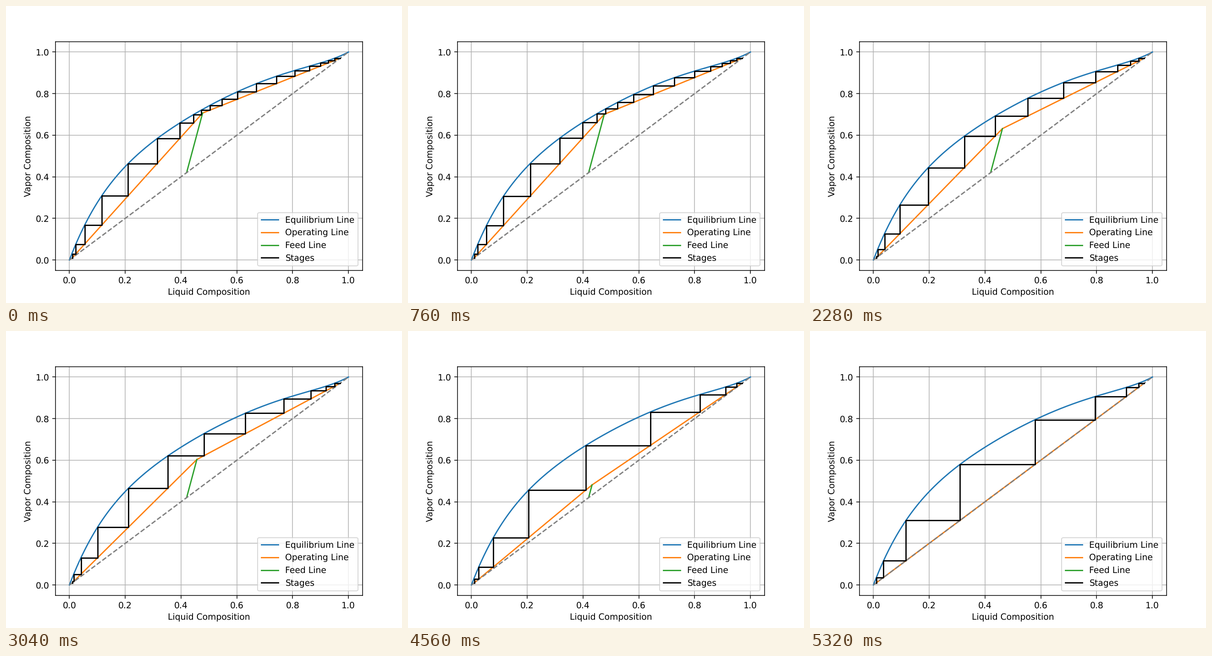
A matplotlib script that plays this animation: 864x648 px, repeating every 6.08 s.

```python
import numpy as np
import matplotlib.pyplot as plt
from matplotlib.animation import FuncAnimation

plt.rcParams["text.hinting"] = "none"

X_DIST, X_BOT, X_FEED = 0.97, 0.01, 0.42
FEED_SLOPE = 5.0
REFLUX = [1.15, 1.2, 1.5, 2, 2.5, 4, 10, 1000]

# Equilibrium curve y = x + x(1 - x) g(x), with g a polynomial through key points
G_X = [0.03, 0.116, 0.31, 0.55, 0.72, 0.87, 0.95]
G_Y = [2.335, 1.884, 1.26, 0.912, 0.76, 0.581, 0.421]
EQ_X = np.linspace(0, 1, 1001)
EQ_Y = EQ_X + EQ_X * (1 - EQ_X) * np.polyval(np.polyfit(G_X, G_Y, 6), EQ_X)


def feed_point(reflux):
    """Where the upper operating line meets the feed line."""
    slope = reflux / (reflux + 1)
    x = ((1 - slope) * X_DIST + (FEED_SLOPE - 1) * X_FEED) / (FEED_SLOPE - slope)
    return x, X_FEED + FEED_SLOPE * (x - X_FEED)


def step_stages(op_x, op_y):
    """Staircase from the distillate down to the bottoms."""
    x = y = X_DIST
    xs, ys = [x], [y]
    while x > X_BOT:
        x = max(np.interp(y, EQ_Y, EQ_X), X_BOT)
        xs.append(x)
        ys.append(y)
        y = np.interp(x, op_x, op_y)
        xs.append(x)
        ys.append(y)
    return xs, ys


fig, ax = plt.subplots(figsize=(6.4, 4.8), dpi=135)
ax.plot(EQ_X, EQ_Y, color="C0", label="Equilibrium Line")
operating, = ax.plot([], [], color="C1", label="Operating Line")
feed, = ax.plot([], [], color="C2", label="Feed Line")
ax.plot([0, 1], [0, 1], "--", color="gray")
stages, = ax.plot([], [], color="black", label="Stages")

ax.set_xlim(-0.05, 1.05)
ax.set_ylim(-0.05, 1.05)
ax.set_xlabel("Liquid Composition")
ax.set_ylabel("Vapor Composition")
ax.grid(True)
ax.legend(loc="lower right")


def draw(i):
    fx, fy = feed_point(REFLUX[i])
    op_x, op_y = [X_BOT, fx, X_DIST], [X_BOT, fy, X_DIST]
    operating.set_data(op_x, op_y)
    feed.set_data([X_FEED, fx], [X_FEED, fy])
    stages.set_data(*step_stages(op_x, op_y))
    return operating, feed, stages


anim = FuncAnimation(fig, draw, frames=len(REFLUX), init_func=lambda: draw(0),
                     interval=760, repeat=True, repeat_delay=0)
plt.show()
```
